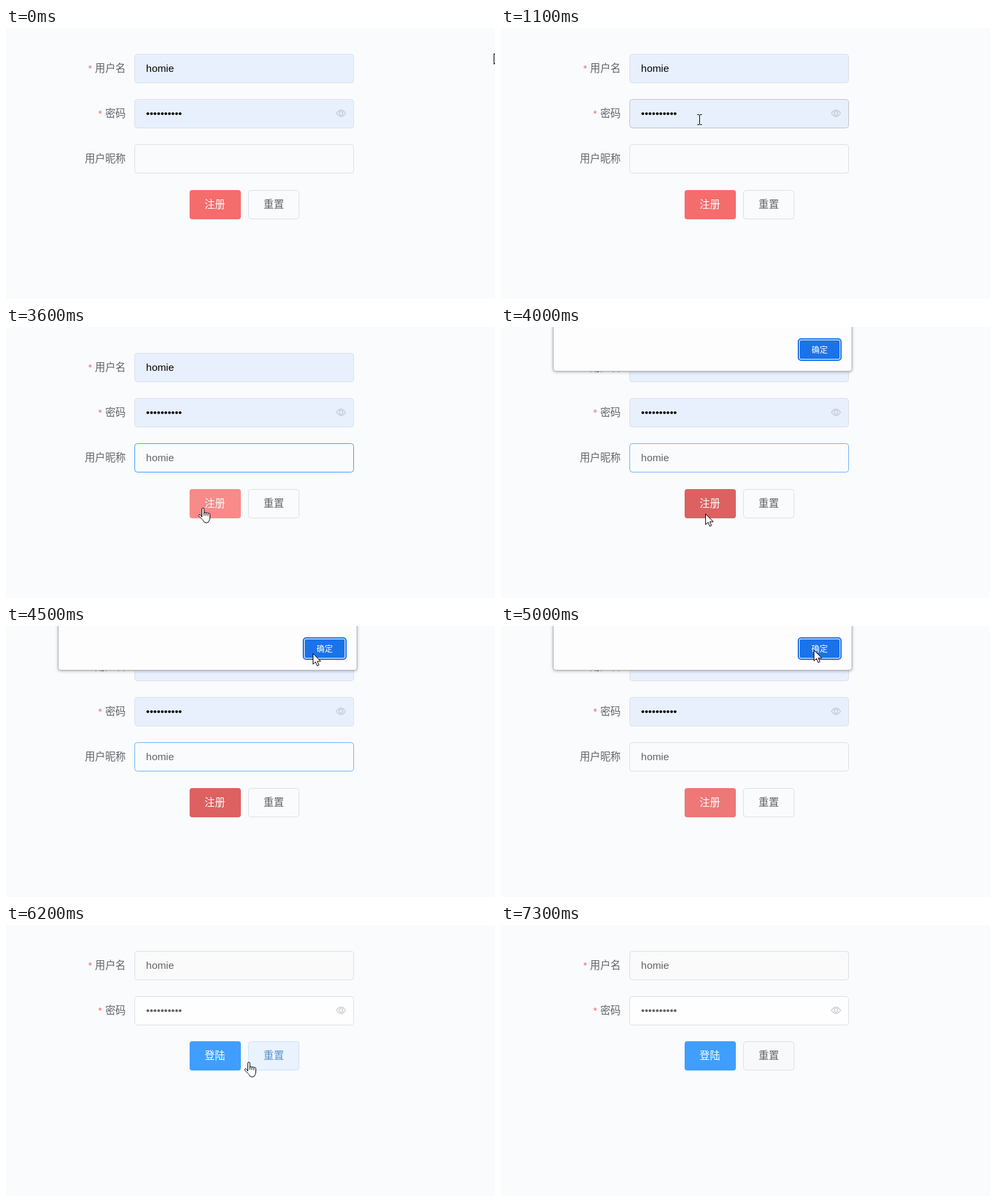
Animation, 735 px wide and 408 px high, one loop 8000 ms. Source, as an HTML page:

```html
<!DOCTYPE html>
<html lang="zh-CN">
<head>
<meta charset="utf-8">
<title>注册</title>
<style>
  html, body { margin: 0; width: 100%; height: 100%; overflow: hidden; background: #fafbfd; }
  svg { display: block; }
  text { font: 15.4px "Noto Sans CJK SC", "Noto Sans CJK", sans-serif; fill: #606266; white-space: pre; }
  .label { text-anchor: end; }
  .mid { text-anchor: middle; }
  .light { fill: #fff; }
  .star { font-family: "Liberation Sans", Arial, sans-serif; fill: #f56c6c; }
  .value { font-family: "Liberation Sans", Arial, sans-serif; }
  .box { stroke: #dcdfe6; fill: #fafbfd; }
  .icon { fill: none; stroke: #c0c4cc; stroke-width: 1.1; }
  .pointer { fill: #fff; stroke: #000; stroke-linejoin: round; }
  .beam { fill: none; stroke: #000; shape-rendering: crispEdges; }
  #dialog { filter: drop-shadow(0 1px 2px rgba(0, 0, 0, .28)); }
  #ok text { font-size: 12.2px; font-weight: 500; fill: #fff; }
</style>
</head>
<body>
<svg width="735" height="408" viewBox="0 0 735 408">
  <text class="star" x="123.5" y="66">*</text>
  <text class="label" x="180" y="66">用户名</text>
  <rect class="box" id="userBox" x="193.5" y="39.5" width="329" height="43" rx="4"/>
  <text class="value" id="user" x="210.6" y="66">homie</text>

  <text class="star" x="138.5" y="134">*</text>
  <text class="label" x="180" y="134">密码</text>
  <rect class="box" id="passBox" x="193.5" y="107.5" width="329" height="43" rx="4"/>
  <text class="value" id="pass" x="210.6" y="134">••••••••••</text>
  <g class="icon">
    <path d="M496.6 128.5Q503.5 118.8 510.4 128.5Q503.5 138.2 496.6 128.5Z"/>
    <circle cx="503.5" cy="128.5" r="2.7"/>
  </g>

  <g id="nickRow">
    <text class="label" x="180" y="202">用户昵称</text>
    <rect class="box" id="nickBox" x="193.5" y="175.5" width="329" height="43" rx="4"/>
    <text class="value" id="nick" x="210.6" y="202"></text>
    <rect id="caret" y="188" width="1" height="17" fill="#606266"/>
  </g>

  <g id="buttons">
    <rect id="main" x="276" y="244" width="77" height="44" rx="4"/>
    <text class="mid light" id="mainText" x="314" y="271">注册</text>
    <rect class="box" id="reset" x="364.5" y="244.5" width="76" height="43" rx="4"/>
    <text class="mid" id="resetText" x="402.5" y="271">重置</text>
  </g>

  <g id="dialog">
    <rect x="78.5" y="-20.5" width="449" height="87" rx="4" fill="#fdfdfe" stroke="#b4b5b7"/>
    <g id="ok">
      <rect x="447" y="18" width="64" height="32" rx="4" fill="#fff" stroke="#1a73e8" stroke-width="2"/>
      <rect id="okFill" x="449" y="20" width="60" height="28" rx="2"/>
      <text class="mid" x="479" y="38.6">确定</text>
    </g>
  </g>

  <g id="cursor">
    <path class="pointer" id="arrow" d="M.5 .5V16.5L4.2 13L6.8 19L9.4 17.9L6.9 12.1H12Z"/>
    <path class="beam" id="beam" d="M-3-7.5H0M1-7.5H4M-3 7.5H0M1 7.5H4M.5-7V7"/>
    <g class="pointer" id="hand" transform="translate(-7)">
      <path d="M5.5 14V2.2a1.6 1.6 0 0 1 3.2 0V8.5a1.5 1.5 0 0 1 3 .3a1.5 1.5 0 0 1 3 .6a1.4 1.4 0 0 1 2.8 .8V15c0 3-1.5 4.5-2 6.5q-3 3-7 0C8 19 4 16 1 12.5c-1-1.8 1-2.8 2.2-1.6z"/>
      <path fill="none" d="M8.7 8V12M11.7 8.8V12M14.7 9.4V12.5"/>
    </g>
  </g>
</svg>
<script>
const LOOP = 8000, STEP = 100;
const $ = id => document.getElementById(id);
const show = (id, on) => $(id).style.display = on ? '' : 'none';
const paint = (id, prop, color) => $(id).style[prop] = color;

const LINE = '#dcdfe6', HOVER = '#c0c4cc', BLUE = '#409eff';

// Tables of [step, value]; a value holds until the next entry.
const nickText = [[0, 0], [20, 1], [22, 2], [27, 3], [28, 4], [29, 5]];
const caretOn = [[0, 0], [17, 1], [34, 0]];
const userLine = [[0, LINE], [5, HOVER], [8, LINE]];
const passLine = [[0, LINE], [10, HOVER], [12, LINE]];
const nickLine = [[0, LINE], [13, HOVER], [14, '#8fc3f5'], [15, BLUE], [37, '#6db4f7'], [48, LINE]];
const mainFill = [[0, '#f56c6c'], [36, '#f88a8a'], [37, '#dd6161'], [48, '#ee7777'],
  [59, BLUE], [64, '#66b1ff'], [65, '#3a8ee6'], [66, '#66b1ff'], [71, BLUE]];
const dialogOn = [[0, 0], [38, 1], [48, 0], [49, 1], [59, 0]];
const okFill = [[0, '#1a73e8'], [56, '#2b7de1']];
const resetHover = [[0, 0], [61, 1], [63, 0]];

// Pointer keys: step, shape, x, y.
const path = [
  [0, 'arrow', 733, 38], [2, 'arrow', 673, 88], [3, 'arrow', 617, 112], [4, 'arrow', 542, 119],
  [5, 'beam', 470, 66], [7, 'beam', 400, 74], [8, 'arrow', 372, 96], [9, 'arrow', 348, 90],
  [10, 'beam', 320, 120], [12, 'arrow', 275, 155], [13, 'beam', 260, 192], [15, 'beam', 254, 201],
  [19, 'beam', 256, 194], [33, 'beam', 256, 194], [34, 'arrow', 268, 222], [36, 'hand', 296, 272],
  [37, 'hand', 305, 281], [40, 'arrow', 307, 281], [42, 'arrow', 340, 264], [43, 'arrow', 382, 197],
  [44, 'arrow', 418, 37], [45, 'arrow', 461, 41], [50, 'arrow', 470, 36], [57, 'arrow', 483, 29],
  [59, 'arrow', 470, 70], [60, 'arrow', 400, 164], [61, 'hand', 382, 190], [62, 'hand', 365, 206],
  [67, 'hand', 315, 211], [69, 'hand', 315, 211], [70, 'hand', 325, 205], [71, 'arrow', 500, 165],
  [72, 'arrow', 668, 127], [73, '', 668, 127]
];

const indexAt = (table, s) => {
  let i = 0;
  while (i + 1 < table.length && table[i + 1][0] <= s) i++;
  return i;
};
const at = (table, s) => table[indexAt(table, s)][1];

function moveCursor(s) {
  const i = indexAt(path, s);
  const [s0, shape, x0, y0] = path[i];
  const [s1, , x1, y1] = path[i + 1] || path[i];
  const k = s1 > s0 ? (s - s0) / (s1 - s0) : 0;
  const x = Math.round(x0 + (x1 - x0) * k), y = Math.round(y0 + (y1 - y0) * k);
  $('cursor').setAttribute('transform', `translate(${x} ${y})`);
  for (const id of ['arrow', 'beam', 'hand']) show(id, id === shape);
}

function render(s) {
  const login = s >= 59, hover = at(resetHover, s);
  const typed = 'homie'.slice(0, at(nickText, s));

  $('nick').textContent = typed;
  $('caret').setAttribute('x', Math.round(211 + (typed ? $('nick').getComputedTextLength() : 0)));
  show('caret', at(caretOn, s));
  show('nickRow', !login);
  paint('userBox', 'stroke', at(userLine, s));
  paint('passBox', 'stroke', at(passLine, s));
  paint('nickBox', 'stroke', at(nickLine, s));
  paint('userBox', 'fill', login ? '#fafafb' : '#e8f0fd');
  paint('passBox', 'fill', login ? '#fefefe' : '#e8f0fd');
  for (const id of ['user', 'pass']) paint(id, 'fill', login ? '#606266' : '#000');

  $('buttons').setAttribute('transform', `translate(0 ${login ? -69 : 0})`);
  $('mainText').textContent = login ? '登陆' : '注册';
  paint('main', 'fill', at(mainFill, s));
  paint('reset', 'fill', hover ? '#eaf2fe' : login ? '#f8f9fb' : '#fafbfd');
  paint('reset', 'stroke', hover ? '#c6e2ff' : LINE);
  paint('resetText', 'fill', hover ? '#5590c8' : '#606266');

  show('dialog', at(dialogOn, s));
  paint('okFill', 'fill', at(okFill, s));
  moveCursor(s);
}

const start = performance.now();
function tick() {
  render(Math.floor((performance.now() - start) % LOOP / STEP));
  requestAnimationFrame(tick);
}
tick();
</script>
</body>
</html>
```
